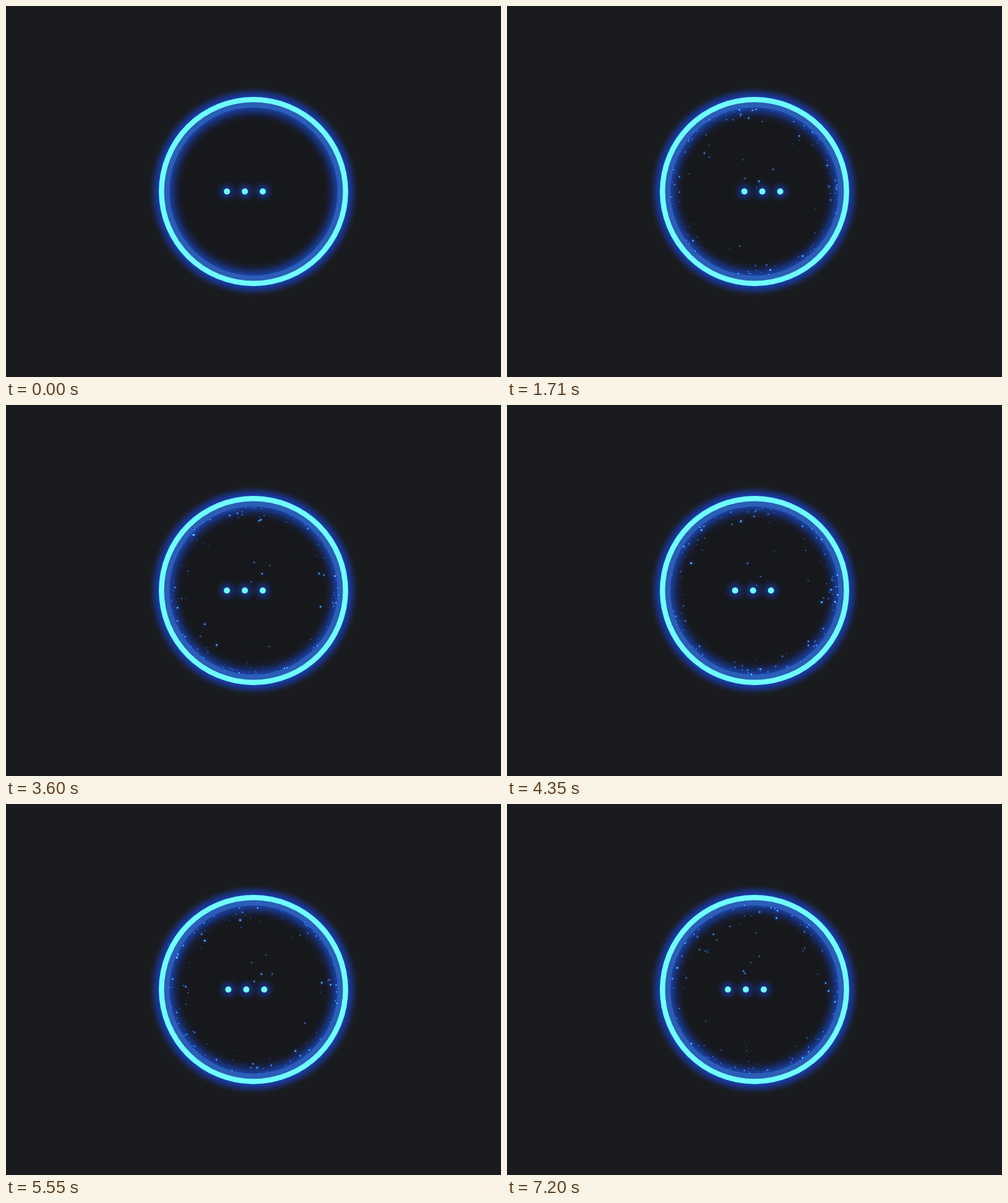
These frames come from a looping animation (800 by 600 pixels, 7230 ms). An HTML page with a canvas:

```html
<!DOCTYPE html>
<html lang="en">
<head>
<meta charset="utf-8">
<title>Glowing loader</title>
<style>
html, body { margin: 0; width: 100%; height: 100%; overflow: hidden; background: #1a1b1e; }
canvas { display: block; }
</style>
</head>
<body>
<canvas width="800" height="600"></canvas>
<script>
const LOOP = 7230, STEP = 30, DOT_CYCLE = 1800, TAU = Math.PI * 2;
const CX = 400, CY = 300, CYAN = '#70ffff';
const ctx = document.querySelector('canvas').getContext('2d');

let seed = 4127;
function random() {
  seed = (seed * 1664525 + 1013904223) >>> 0;
  return seed / 4294967296;
}
const spread = () => random() + random() + random() - 1.5;

// Sparks leave eight spots on the ring, or the ring at large, and drift inwards.
function ringSpark() {
  const spot = Math.floor(random() * 8) * TAU / 8;
  const angle = random() < 0.6 ? spot + spread() * 0.28 : random() * TAU;
  return {
    born: random() * LOOP, life: 900 + random() * 900,
    angle, turn: spread() * 0.16,
    radius: 139 - random() * 4, reach: 4 + 52 * random() ** 2.5,
    size: 0.4 + 0.9 * random() ** 2
  };
}

// A few sparks rise from the middle.
function middleSpark() {
  return {
    born: random() * LOOP, life: 1300 + random() * 600,
    angle: -TAU / 4 + spread() * 0.9, turn: 0,
    radius: 2, reach: -40 - random() * 35,
    size: 0.6 + random() * 0.6
  };
}

const sparks = [
  ...Array.from({ length: 780 }, ringSpark),
  ...Array.from({ length: 20 }, middleSpark)
];

function disc(x, y, r, fill) {
  ctx.fillStyle = fill;
  ctx.beginPath();
  ctx.arc(x, y, r, 0, TAU);
  ctx.fill();
}

function radial(x, y, inner, outer, stops) {
  const fill = ctx.createRadialGradient(x, y, inner, x, y, outer);
  stops.forEach((color, i) => fill.addColorStop(i / (stops.length - 1), color));
  return fill;
}

const outerGlow = radial(CX, CY, 153, 170, ['#183da8', '#193389', '#192a5c', '#1a2034', '#1a1b1e']);
const innerGlow = radial(CX, CY, 114, 136, ['#17181b', '#171b29', '#172347', '#183176', '#1a419f']);

function halo(x, y, r, alpha) {
  const blue = a => `rgba(22,66,205,${a * alpha})`;
  disc(x, y, r, radial(x, y, 0, r, [blue(0.8), blue(0.6), blue(0.34), blue(0.12), blue(0)]));
}

function drawSpark(s, time) {
  const age = (time - s.born) / s.life;
  if (age <= 0 || age >= 1) return;
  const angle = s.angle + s.turn * age;
  const r = s.radius - s.reach * age;
  const x = CX + r * Math.cos(angle), y = CY + r * Math.sin(angle);
  const size = s.size * (0.4 + 0.6 * Math.sin(Math.PI * age));
  halo(x, y, size * 5, 0.7);
  disc(x, y, size, CYAN);
}

function draw(time) {
  ctx.fillStyle = '#1a1b1e';
  ctx.fillRect(0, 0, 800, 600);
  disc(CX, CY, 170, outerGlow);
  disc(CX, CY, 153, CYAN);
  disc(CX, CY, 144.5, '#2b5eb6');
  disc(CX, CY, 136, innerGlow);

  const left = 357 + 28 * (time % DOT_CYCLE) / DOT_CYCLE;
  const dots = [0, 29, 58].map(gap => left + gap);
  dots.forEach(x => halo(x, CY, 19, 0.9));
  dots.forEach(x => disc(x, CY, 5, CYAN));
  sparks.forEach(s => drawSpark(s, time));
}

const start = performance.now();
function tick() {
  const time = (performance.now() - start) % LOOP;
  draw(Math.floor(time / STEP) * STEP);
  requestAnimationFrame(tick);
}
tick();
</script>
</body>
</html>
```
